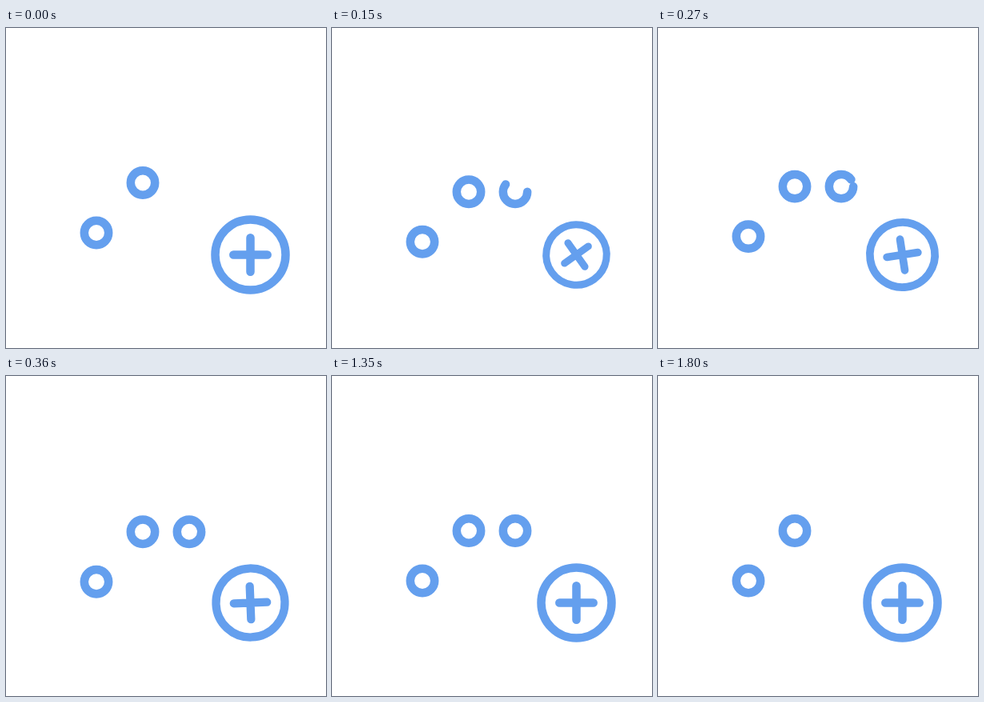
Recreate the animation shown at these times as an HTML page with a canvas. Size 400x400 px, loop 1830 ms.

```html
<!DOCTYPE html>
<html lang="en">
<head>
<meta charset="utf-8">
<title>Add a ring</title>
<style>
  html, body { margin: 0; width: 100%; height: 100%; overflow: hidden; background: #fff; }
  canvas { display: block; }
</style>
</head>
<body>
<canvas id="stage" width="400" height="400"></canvas>
<script>
const ctx = document.getElementById('stage').getContext('2d');
const BLUE = '#649fee';
const STEP = 30, LOOP = 1830;
const LINE = 10.5, RING_RADIUS = 15.2;

// Cubic Bezier easing with end heights 0 and 1; x is solved by bisection.
const easing = (x1, x2) => u => {
  if (u <= 0) return 0;
  if (u >= 1) return 1;
  let low = 0, high = 1, t;
  for (let i = 0; i < 24; i++) {
    t = (low + high) / 2;
    const x = 3 * (1 - t) ** 2 * t * x1 + 3 * (1 - t) * t * t * x2 + t ** 3;
    if (x < u) low = t; else high = t;
  }
  return t * t * (3 - 2 * t);
};
const snap = easing(0.4, 0);
const press = easing(0.33, 0.67);
const liftRings = easing(0.33, 0.12);
const liftButton = easing(0.33, 0.28);

// Rises to 1 at step 5, then settles back to 0 at step 17.
const dip = (step, lift) => step < 5 ? press(step / 5) : 1 - lift((step - 5) / 12);

function arc(x, y, radius, from, to, color = BLUE, width = LINE) {
  ctx.beginPath();
  ctx.arc(x, y, radius, from, to);
  ctx.strokeStyle = color;
  ctx.lineWidth = width;
  ctx.stroke();
}

const TURN = 2 * Math.PI;
const ring = (x, y) => arc(x, y, RING_RADIUS, 0, TURN);

function drawNewRing(x, y, drawn, erased) {
  if (drawn <= 0 || erased >= 1) return;
  arc(x, y, RING_RADIUS, 0, TURN * drawn);
  if (erased <= 0) return;
  ctx.globalAlpha = erased;
  arc(x, y, RING_RADIUS, TURN * (1 - erased), TURN, '#fff', LINE + 0.8);
  ctx.globalAlpha = 1;
}

function drawButton(scale, angle) {
  ctx.save();
  ctx.translate(305.5, 283.5);
  ctx.scale(scale, scale);
  ctx.rotate(angle);
  arc(0, 0, 44, 0, TURN);
  ctx.beginPath();
  ctx.moveTo(-21.2, 0);
  ctx.lineTo(21.2, 0);
  ctx.moveTo(0, -21.2);
  ctx.lineTo(0, 21.2);
  ctx.stroke();
  ctx.restore();
}

function draw(now) {
  const step = Math.floor((now % LOOP) / STEP);
  const drawn = snap(step / 16);
  const erased = snap((step - 44) / 16);
  const drop = 11.3 * dip(step, liftRings);

  ctx.fillStyle = '#fff';
  ctx.fillRect(0, 0, 400, 400);
  ctx.lineCap = 'round';
  ring(113, 256 + drop);
  ring(171, 193.5 + drop);
  drawNewRing(229, 193.5 + drop, drawn, erased);
  drawButton(1 - 0.141 * dip(step, liftButton), drawn * Math.PI / 2);
}

const start = performance.now();
function tick() {
  draw(performance.now() - start);
  requestAnimationFrame(tick);
}
tick();
</script>
</body>
</html>
```
